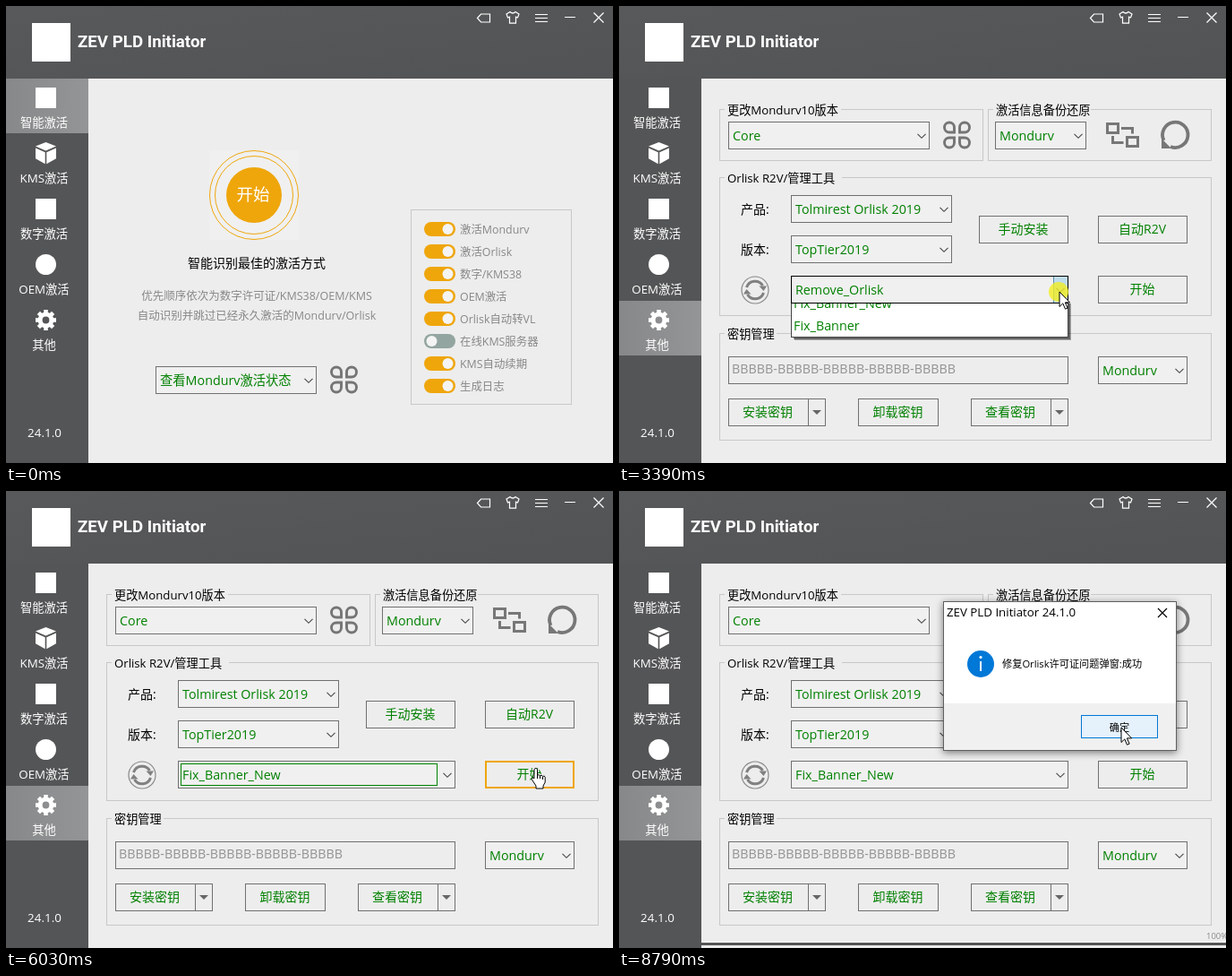
An HTML page for the animation above (8920 ms loop, 678 by 510 pixels).

```html
<!DOCTYPE html>
<html lang="zh-CN">
<head>
<meta charset="utf-8">
<title>ZEV PLD Initiator</title>
<style>
html, body { margin: 0; width: 100%; height: 100%; overflow: hidden; background: #ededed; }
svg { display: block; width: 678px; height: 510px; }
text { font-family: "Open Sans", "Noto Sans CJK SC", "Noto Sans CJK", sans-serif; white-space: pre; }
#dialog { filter: drop-shadow(0 2px 4px rgba(0, 0, 0, .5)); }
</style>
</head>
<body>
<svg id="stage" viewBox="0 0 678 510" xmlns="http://www.w3.org/2000/svg"></svg>
<script>
const LOOP = 8920, TICK = 125.6;
const GREEN = '#008000', GREY = '#888', GOLD = '#efa60b', BLUE = '#0078d7';

// Drawing helpers return SVG markup
const text = (x, y, s, size = 14, fill = '#000', anchor = 'start', more = '') =>
  `<text x="${x}" y="${y}" font-size="${size}" fill="${fill}" text-anchor="${anchor}" ${more}>${s}</text>`;
const rect = (x, y, w, h, fill, more = '') =>
  `<rect x="${x}" y="${y}" width="${w}" height="${h}" fill="${fill}" ${more}/>`;
const frame = (x, y, w, h, stroke = '#707070', fill = 'none', more = '') =>
  rect(x + .5, y + .5, w - 1, h - 1, fill, `stroke="${stroke}" ${more}`);
const circle = (x, y, r, fill, more = '') => `<circle cx="${x}" cy="${y}" r="${r}" fill="${fill}" ${more}/>`;
const line = (d, stroke, width = 1, more = '') =>
  `<path d="${d}" fill="none" stroke="${stroke}" stroke-width="${width}" ${more}/>`;
const shape = (d, fill, more = '') => `<path d="${d}" fill="${fill}" ${more}/>`;
const group = (id, body, more = '') => `<g id="${id}" ${more}>${body}</g>`;
const spin = (n, body) => Array.from({ length: n }, (_, i) =>
  `<g transform="rotate(${i * 360 / n})">${body}</g>`).join('');
const at = (x, y, body) => `<g transform="translate(${x} ${y})">${body}</g>`;

const chevron = (x, y) => line(`M${x - 4.5} ${y - 2.2}l4.5 4.5 4.5 -4.5`, '#444', 1.1);
const combo = (x, y, w, s) =>
  frame(x, y, w, 31, '#707070', '#f0f0f0') + text(x + 5, y + 21, s, 14.3, GREEN) + chevron(x + w - 9, y + 16);
const button = (x, y, w, s, split = 0) =>
  frame(x, y, w, 31) + text(x + (w - split) / 2 - .5, y + 19.5, s, 14, GREEN, 'middle') +
  (split ? rect(x + w - split, y, 1, 31, '#707070') +
    shape(`M${x + w - 15} ${y + 13}h10l-5 5z`, '#666') : '');
const fieldset = (x, y, w, h, s, gap) =>
  frame(x, y, w, h, '#c8c8c8') + rect(x + 6, y - 4, gap, 9, '#ededed') + text(x + 9, y + 6, s, 13.2);
const clover = (x, y) =>
  at(x, y, spin(4, line('M-3 -3H-8.5A5.5 5.5 0 1 1 -3 -8.5Z', '#757575', 2.9)));

const gear = at(44.5, 350.5, spin(8, rect(-2.3, -11.5, 4.6, 5, '#fff')) +
  circle(0, 0, 6.4, 'none', 'stroke="#fff" stroke-width="5"'));
const cube = shape('M44.5 152l11.5 4.5 -11.5 5 -11.5 -5zM33 158.5l10.7 4.7v13l-10.7 -6zM56 158.5l-10.7 4.7v13l10.7 -6z', '#fff');

function chrome() {
  const icons = 'M526.5 13.500l4 -4.500h10v9h-10zM559 9l4 -2.500q3 3 6 0l4 2.500 -1.500 4 -2 -.8v7h-7v-7l-2 .8z' +
    'M591 9.500h14M591 13.500h14M591 17.500h14M624 12.500h12M656.500 7.500l11 11M667.500 7.500l-11 11';
  const names = ['智能激活', 'KMS激活', '数字激活', 'OEM激活', '其他'];
  return `<defs><linearGradient id="dark" x2="1" y2="1"><stop stop-color="#58595a"/><stop offset="1" stop-color="#525354"/></linearGradient>
    <linearGradient id="lit"><stop stop-color="#878889"/><stop offset="1" stop-color="#949596"/></linearGradient>
    <clipPath id="below"><rect x="185" y="332" width="330" height="120"/></clipPath></defs>` +
    rect(0, 0, 678, 510, '#ededed') + rect(0, 0, 678, 81, 'url(#dark)') + rect(0, 81, 92, 429, '#545556') +
    rect(29, 19, 43, 43, '#fff') + text(80, 46, 'ZEV PLD Initiator', 18.7, '#fff', 'start', 'style="font-family:Roboto,sans-serif;font-weight:600"') +
    line(icons, '#fff', 1.2) +
    rect(0, 0, 92, 61, '#fff', 'id="hover" opacity=".15"') + rect(0, 0, 92, 61, 'url(#lit)', 'id="active"') +
    rect(33, 91, 23, 23, '#fff') + cube + rect(33, 215, 23, 23, '#fff') + circle(44.5, 288.5, 11.5, '#fff') + gear +
    names.map((s, i) => text(42.5, 135 + 62 * i, s, 13.3, '#fff', 'middle')).join('') +
    text(43, 481, '24.1.0', 13.4, '#fff', 'middle');
}

function startPage() {
  const options = ['激活Mondurv', '激活Orlisk', '数字/KMS38', 'OEM激活', 'Orlisk自动转VL', '在线KMS服务器', 'KMS自动续期', '生成日志'];
  const toggles = options.map((s, i) => {
    const y = 249 + 25 * i, on = i != 5;
    return rect(467, y - 8, 35, 16, on ? GOLD : '#93a5a0', 'rx="8"') +
      circle(on ? 493.5 : 475.5, y, 6, '#f4f4f4') + text(507, y + 5, s, 12.4, GREY);
  }).join('');
  const ring = `stroke="${GOLD}" stroke-width="1"`;
  return rect(227, 161, 100, 100, '#f0f0f0') + circle(277, 211, 49.5, 'none', ring) + circle(277, 211, 43.5, 'none', ring) +
    circle(277, 211, 31, GOLD) + text(276, 217, '开始', 18.5, '#fff', 'middle', 'font-weight="300"') +
    text(280, 292, '智能识别最佳的激活方式', 14, '#000', 'middle') +
    text(280, 328, '优先顺序依次为数字许可证/KMS38/OEM/KMS', 12.5, GREY, 'middle') +
    text(280, 350, '自动识别并跳过已经永久激活的Mondurv/Orlisk', 12.5, GREY, 'middle') +
    combo(167, 402, 180, '查看Mondurv激活状态') + clover(377.5, 417) +
    frame(452, 227, 180, 218, '#c8c8c8') + toggles;
}

function toolsPage() {
  const swap = line('M545.5 131.500h12v10h-12zM567.500 146.500h12v10h-12zM561 136.500h12.500v6M551.500 145v7.500h12', '#777', 3);
  const reload = line('M608.500 150A14.200 14.200 0 1 1 616 157', '#777', 3.8) + shape('M606 148v11h11z', '#777');
  const sync = at(152, 317, circle(0, 0, 15, 'none', 'stroke="#888" stroke-width="1.2"') +
    spin(2, line('M-9.500 -3A10 10 0 0 1 8.500 -5', '#808080', 3) + shape('M4.500 -4.500h8.500l-3.500 5.500z', '#808080')));
  return fieldset(112, 115, 295, 58, '更改Mondurv10版本', 130) + fieldset(412, 115, 250, 58, '激活信息备份还原', 109) +
    fieldset(112, 191, 550, 155, 'Orlisk R2V/管理工具', 131) + fieldset(112, 365, 550, 120, '密钥管理', 58) +
    combo(122, 129, 225, 'Core') + clover(377.5, 144) + combo(420, 129, 102, 'Mondurv') + swap + reload +
    text(136, 232, '产品:', 14) + combo(192, 211, 180, 'Tolmirest Orlisk 2019') +
    text(136, 277, '版本:', 14) + combo(192, 256, 180, 'TopTier2019') +
    button(402, 234, 100, '手动安装') + button(535, 234, 100, '自动R2V') +
    sync + combo(192, 301, 310, '<tspan id="choice"></tspan>') + button(535, 301, 100, '开始') +
    frame(122, 391, 380, 31) + text(126, 410, 'BBBBB-BBBBB-BBBBB-BBBBB-BBBBB', 14.3, '#929292') +
    combo(535, 391, 100, 'Mondurv') +
    button(122, 438, 109, '安装密钥', 20) + button(267, 438, 90, '卸载密钥') + button(393, 438, 109, '查看密钥', 20) +
    group('arrow', rect(485, 302, 16, 29, '#bfdceb') + rect(485, 301, 1, 31, '#5d90ad') + chevron(493, 317)) +
    frame(192, 301, 310, 31, '#000', 'none', 'id="edge"') +
    frame(195, 304, 287, 25, GREEN, 'none', 'id="focus"') +
    rect(536, 302, 98, 29, 'none', `id="hot" stroke="${GOLD}" stroke-width="2"`);
}

const items = ['Remove_Orlisk', 'Clean_License', 'Fix_Banner_New', 'Fix_Banner'];
const list = () => `<g clip-path="url(#below)">` + group('list',
  rect(196, 336, 309, 101, '#000', 'opacity=".3"') + rect(195, 335, 309, 101, '#000', 'opacity=".4"') +
  frame(192, 332, 310, 102, '#444', '#fff', 'id="listEdge"') +
  items.map((s, i) => text(195, 351 + 25 * i, s, 14.3, GREEN)).join('') +
  frame(193, 333, 308, 25, GREEN, 'none', 'id="row"')) + '</g>';

const dialog = () =>
  frame(362, 123, 261, 167, '#606060', '#fff') + rect(363, 237, 259, 52, '#f0f0f0') +
  text(366, 140, 'ZEV PLD Initiator 24.1.0', 13.3) + line('M602 131l10 10M612 131l-10 10', '#000', 1.2) +
  circle(404, 193, 15, BLUE) + rect(403, 190, 2, 11, '#fff') + circle(404, 185.5, 1.6, '#fff') +
  text(428, 197, '修复Orlisk许可证问题弹窗:成功', 11.2) +
  frame(516, 250, 86, 26, BLUE, '#e5f1fb', 'id="ok"') + text(559, 267.5, '确定', 11.2, '#000', 'middle');

const pointer = group('pointer', shape('M0 0V16.500l3.800 -3.600 2.700 6.300 2.600 -1.100 -2.700 -6.200h5.200z', '#fff', 'stroke="#000"'));
const hand = group('hand', shape('M-2 1.500q2 -2.500 3.500 0v7q1.500 -2 3 .3 1.700 -1.600 3 .6 2 -1.200 2.700 1.100v5.500l-2.200 4v3h-8v-3l-5 -7.500q.5 -3 3 -.8z', '#fff', 'stroke="#000"') +
  line('M1.500 8v4M4.500 9v3M7.500 10v3', '#000'));

const stage = document.getElementById('stage');
stage.innerHTML = chrome() + group('start', startPage()) + group('tools', toolsPage()) + list() +
  group('progress', rect(92, 503, 586, 1, '#fafafa') + rect(92, 504, 586, 3, '#555', 'id="bar"') +
    text(656, 500, '100%', 9.5, GREY, 'start', 'id="percent"')) +
  group('dialog', dialog()) + circle(0, 0, 11, '#f2ee22', 'id="click" opacity=".8"') +
  group('cursor', pointer + hand);

const el = {};
stage.querySelectorAll('[id]').forEach(e => el[e.id] = e);
const show = (id, on) => el[id].style.display = on ? '' : 'none';
const set = (id, name, value) => el[id].setAttribute(name, value);
const clamp = (v, a, b) => Math.min(b, Math.max(a, v));

// Pointer stops: time, x, y
const path = [[490, -8, 425], [880, 40, 362], [1130, 40, 362], [1850, 28, 440], [2140, 28, 440], [2900, 492, 319], [3890, 492, 319],
  [4500, 281, 396], [4950, 281, 396], [5700, 592, 309], [6350, 592, 309], [6800, 570, 332], [7900, 570, 332], [8400, 561, 264]];
const clicks = [1000, 3260, 4760, 6270];

function place(t) {
  const i = path.findIndex(p => p[0] > t);
  if (i < 1) return path[i < 0 ? path.length - 1 : 0].slice(1);
  const [t0, x0, y0] = path[i - 1], [t1, x1, y1] = path[i];
  const u = (t - t0) / (t1 - t0), e = u * u * (3 - 2 * u);
  return [x0 + (x1 - x0) * e, y0 + (y1 - y0) * e];
}

function draw(t) {
  const [x, y] = place(t);
  const tools = t >= 1120, open = t >= 3316 && t < 4880, chosen = t >= 4880;
  const overStart = tools && x > 535 && x < 635 && y > 301 && y < 331 && t < 6700;
  const item = Math.floor((y - 81) / 62);
  const overItem = t > 490 && x < 92 && item >= 0 && item < 5;

  show('start', !tools);
  show('tools', tools);
  set('active', 'y', tools ? 329 : 81);
  show('hover', overItem);
  set('hover', 'y', 81 + 62 * item);

  el.choice.textContent = chosen ? items[2] : items[0];
  show('edge', t > 2800 && t < 4880);
  set('edge', 'stroke', t > 3450 ? BLUE : '#000');
  show('arrow', t > 2800 && t < 4880);
  show('focus', chosen && t < 6400);
  show('hot', overStart);

  show('list', open);
  const slid = clamp((t - 3316) / 200, 0, 1);
  set('list', 'transform', `translate(0 ${Math.round(-102 * (1 - slid))})`);
  set('listEdge', 'stroke', slid < 1 ? '#444' : BLUE);
  set('row', 'y', 333.5 + 25 * clamp(Math.floor((y - 333) / 25), 0, 3));

  show('progress', t > 6500);
  set('bar', 'width', t < 6650 ? 573 : 586);
  show('percent', t > 6650);
  show('dialog', t > 7520);
  const overOk = x > 516 && x < 602 && y > 250 && y < 276;
  set('ok', 'fill', overOk ? '#e5f1fb' : '#e1e1e1');

  show('cursor', t > 490);
  set('cursor', 'transform', `translate(${Math.round(x)} ${Math.round(y)})`);
  show('hand', overStart);
  show('pointer', !overStart);
  show('click', clicks.some(c => t >= c - 10 && t < c + 200));
  set('click', 'cx', x - 1);
  set('click', 'cy', y);
}

// The picture advances about eight times a second
function tick(now) {
  draw(Math.floor((now % LOOP + 8) / TICK) % 71 * TICK);
  requestAnimationFrame(tick);
}
tick(performance.now());
</script>
</body>
</html>
```
